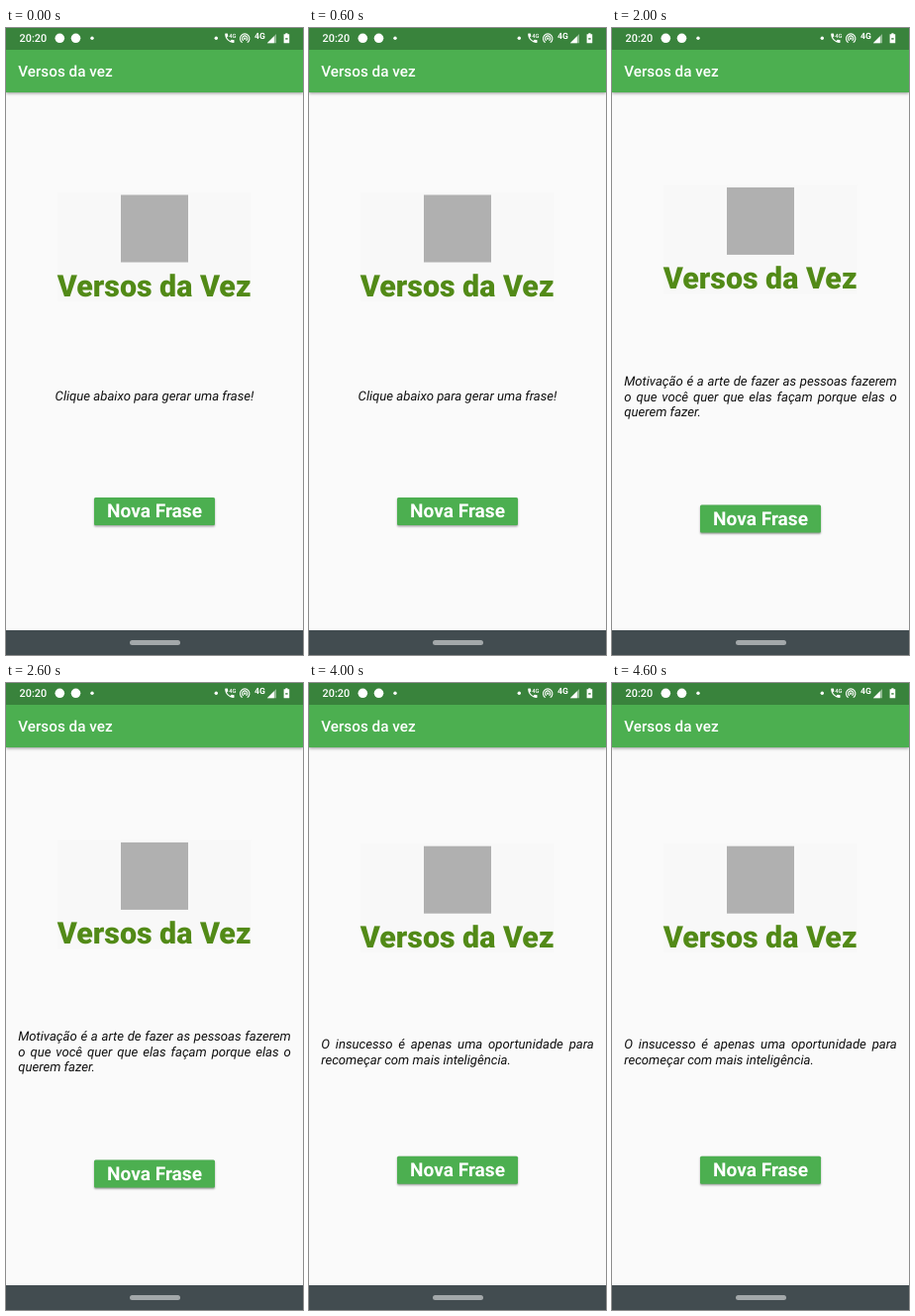
An HTML page for the animation above (5 s loop, 300 by 633 pixels).

```html
<!DOCTYPE html>
<html lang="pt">
<head>
<meta charset="utf-8">
<title>Versos da vez</title>
<style>
  html, body { margin: 0; width: 100%; height: 100%; overflow: hidden; background: #fafafa; }
  #app {
    position: relative; width: 300px; height: 633px; overflow: hidden;
    background: #fafafa; font-family: Roboto, sans-serif;
    text-rendering: geometricPrecision;
  }
  #app > * { position: absolute; }
  #bar {
    left: 0; top: 0; width: 300px; height: 65px; background: #4caf50;
    box-shadow: 0 1px 3px rgba(0, 0, 0, .4);
  }
  #status { left: 0; top: 0; width: 300px; height: 22px; background: #39833c; }
  #title { left: 12.2px; top: 34px; font: 500 15.28px/20px Roboto, sans-serif; color: #fff; }
  #logo { left: 0; top: 0; }
  #phrase {
    left: 12.2px; width: 275.6px; top: 373.4px; transform: translateY(-50%);
    font: italic 400 13.15px/15.25px Roboto, sans-serif; color: #101010;
  }
  #phrase div { text-align: justify; text-align-last: justify; }
  #phrase div:last-child { text-align-last: left; }
  #phrase div:only-child { text-align-last: center; }
  #button {
    left: 89.2px; top: 474.2px; width: 121.6px; height: 27.5px; border-radius: 1.5px;
    background: #4caf50; color: #fff; text-align: center;
    font: 700 19.1px/27.5px Roboto, sans-serif;
    box-shadow: 0 1.5px 2px rgba(0, 0, 0, .32), 0 0 1px rgba(0, 0, 0, .15);
  }
  #nav { left: 0; top: 608px; width: 300px; height: 25px; background: #424c50; }
  #nav i {
    position: absolute; left: 124.5px; top: 10px; width: 51px; height: 4.6px;
    border-radius: 3px; background: #a3a8aa;
  }
</style>
</head>
<body>
<div id="app">
  <div id="bar"></div>
  <svg id="status" width="300" height="22" fill="#fff" font-family="Roboto, sans-serif">
    <text x="13.6" y="14" font-size="10.9" font-weight="500">20:20</text>
    <circle cx="54.3" cy="10.3" r="4.8"/>
    <circle cx="70.5" cy="10.3" r="4.8"/>
    <circle cx="87" cy="10.3" r="1.7"/>
    <circle cx="212.3" cy="10.3" r="1.7"/>
    <path transform="translate(219.6 4) scale(.52)" d="M6.62 10.79c1.44 2.83 3.76 5.14 6.59 6.59l2.2-2.2c.27-.27.67-.36 1.02-.24 1.12.37 2.33.57 3.57.57.55 0 1 .45 1 1V20c0 .55-.45 1-1 1-9.39 0-17-7.61-17-17 0-.55.45-1 1-1h3.5c.55 0 1 .45 1 1 0 1.25.2 2.45.57 3.57.11.35.03.74-.25 1.02z"/>
    <text x="225.2" y="10" font-size="5.8" font-weight="500">4G</text>
    <g fill="none" stroke="#fff" stroke-width="1.1">
      <path d="M238.7 14.6A4.7 4.7 0 1 1 243.7 14.6"/>
      <path d="M239.8 12.7A2.6 2.6 0 1 1 242.6 12.7"/>
    </g>
    <circle cx="241.2" cy="10.6" r="1.2"/>
    <text x="251" y="11.2" font-size="8.6" font-weight="700">4G</text>
    <path d="M263.8 15.2L273 6V15.2Z" fill-opacity=".45"/>
    <path d="M263.8 15.2L270.8 8.2V15.2Z"/>
    <path d="M282.3 5.2H284.5V6.2H286.2V15.3H280.6V6.2H282.3Z"/>
    <path d="M282.2 10.2H284.6V11.6H282.2Z" fill="#39833c"/>
  </svg>
  <div id="title">Versos da vez</div>
  <svg id="logo" width="300" height="300">
    <rect x="52" y="166" width="195.5" height="110" fill="#f8f8f8"/>
    <rect x="116" y="168.5" width="68" height="68" fill="#b0b0b0"/>
    <text x="149.7" y="271" text-anchor="middle" fill="#528a17"
      font-family="Roboto, sans-serif" font-size="30.4" font-weight="900">Versos da Vez</text>
  </svg>
  <div id="phrase"></div>
  <div id="button">Nova Frase</div>
  <div id="nav"><i></i></div>
</div>
<script>
  const STEP = 1000;
  const GAP = 3.8; // spacing lost on each side per extra line
  const phrases = [
    ["Clique abaixo para gerar uma frase!"],
    ["É parte da cura o desejo de ser curado."],
    ["Motivação é a arte de fazer as pessoas fazerem",
     "o que você quer que elas façam porque elas o",
     "querem fazer."],
    ["Só se pode alcançar um grande êxito quando",
     "nos mantemos fiéis a nós mesmos."],
    ["O insucesso é apenas uma oportunidade para",
     "recomeçar com mais inteligência."]
  ];
  const $ = id => document.getElementById(id);
  const start = performance.now();
  let shown = -1;

  function show(index) {
    const lines = phrases[index];
    const shift = GAP * (lines.length - 1);
    $("phrase").replaceChildren(...lines.map(text => {
      const line = document.createElement("div");
      line.textContent = text;
      return line;
    }));
    $("logo").style.transform = `translateY(${-shift}px)`;
    $("button").style.transform = `translateY(${shift}px)`;
    shown = index;
  }

  function tick() {
    const index = Math.floor((performance.now() - start) / STEP) % phrases.length;
    if (index !== shown) show(index);
    requestAnimationFrame(tick);
  }
  tick();
</script>
</body>
</html>
```
